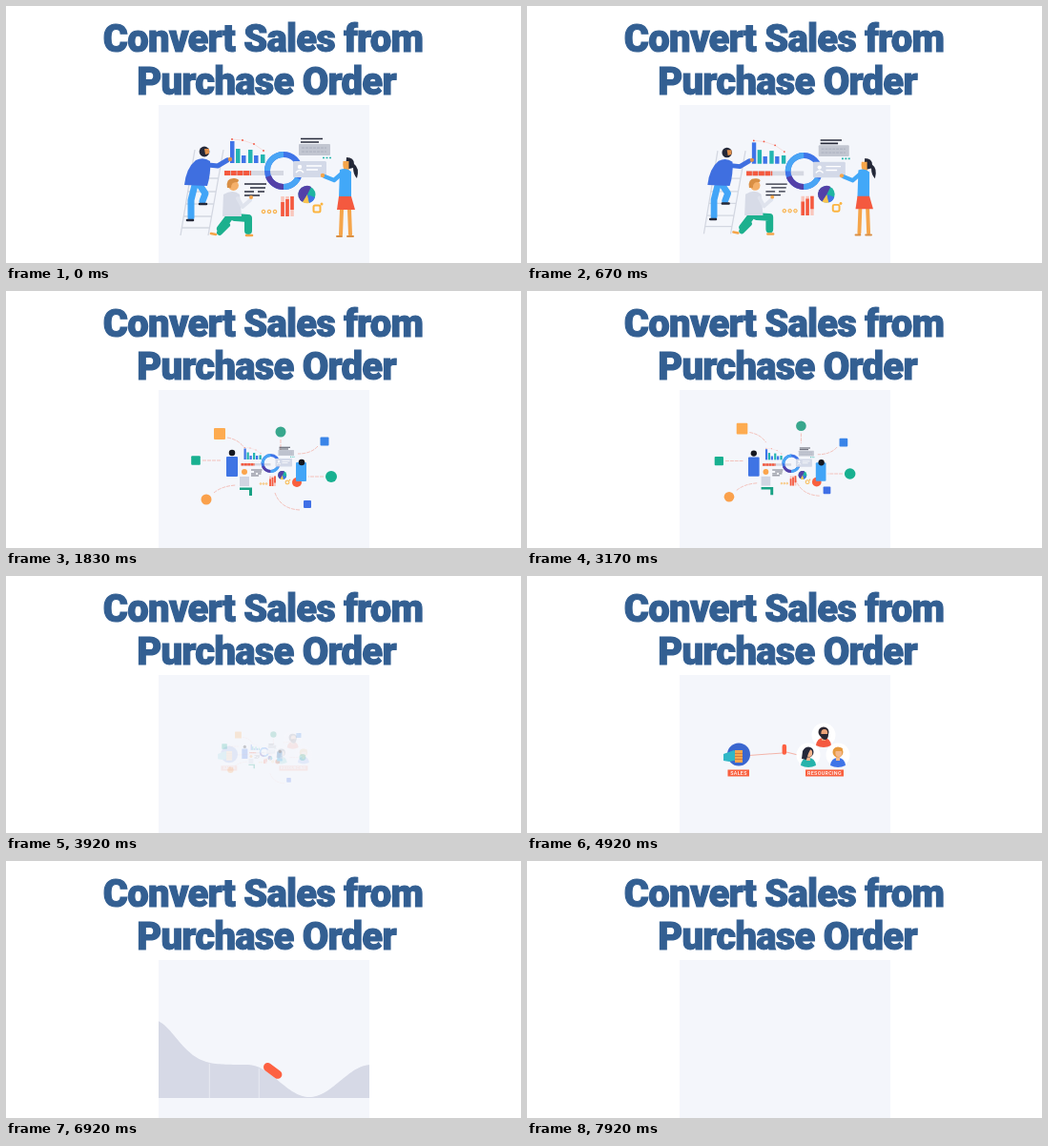
An HTML page for the animation above (8000 ms loop, 540 by 270 pixels).

```html
<!DOCTYPE html>
<html lang="en">
<head>
<meta charset="utf-8">
<title>Convert Sales from Purchase Order</title>
<style>
  html, body { margin: 0; height: 100%; overflow: hidden; background: #fff; }
  svg { display: block; width: 100%; height: 100%; }
  .title { font: 900 40px Roboto, "Open Sans", sans-serif; letter-spacing: -.75px; fill: #335f92; stroke: #335f92; stroke-width: 1.1; text-anchor: middle; }
  .label { font: 500 5.4px Roboto, sans-serif; letter-spacing: .3px; fill: #fff; text-anchor: middle; }
  .limb { fill: none; stroke-linecap: round; stroke-linejoin: round; }
</style>
</head>
<body>
<svg viewBox="0 0 540 270">
  <clipPath id="frame"><rect x="160" y="104" width="221" height="166"/></clipPath>
  <text class="title" x="269.5" y="47.5">Convert Sales from</text>
  <text class="title" x="273" y="92.5">Purchase Order</text>
  <rect x="160" y="104" width="221" height="166" fill="#f4f6fb"/>

  <g clip-path="url(#frame)">
    <g id="apps"></g>

    <g id="office">
      <g id="ladder" stroke="#d3d7e1" stroke-width="1.3" fill="none">
        <path d="M198 151L183 241M228 151L212 241M195 168h30M193 181h30M190 195h30M188 208h30M186 221h30M184 233h30"/>
      </g>
      <g id="widgets">
        <g id="bars"></g>
        <path d="M237 140L248 141L260 145L270 152" fill="none" stroke="#f6c4bd" stroke-width=".5"/>
        <g fill="#f4513d"><circle cx="237" cy="140" r=".9"/><circle cx="248" cy="141" r=".9"/><circle cx="260" cy="145" r=".9"/><circle cx="270" cy="152" r=".9"/></g>
        <path d="M229 175.5h62" stroke="#d5d8e2" stroke-width="5"/>
        <path d="M229 175.5h28" stroke="#f4593f" stroke-width="5" stroke-dasharray="6 .7"/>
        <g fill="none" stroke-width="6">
          <circle cx="291" cy="173" r="17" stroke="#3f74e8"/>
          <path d="M274 173A17 17 0 0 1 291 156" stroke="#4aa5f5"/>
          <path d="M291 190A17 17 0 0 1 275 179" stroke="#5340a8"/>
          <path d="M306 181A17 17 0 0 1 291 190" stroke="#4aa5f5"/>
        </g>
        <path d="M309 139.5h23M309 143h19" stroke="#272b3b" stroke-width="1.6"/>
        <rect x="307" y="145" width="33" height="12" rx="1" fill="#c2c6d1"/>
        <path d="M310 149h26M310 153h26" stroke="#abb0be" stroke-dasharray="3 1"/>
        <path d="M332 159.500h9" stroke="#2ab7ad" stroke-width="1.700" stroke-dasharray="2 1.500"/>
        <rect x="301" y="163" width="35" height="17" rx="1.500" fill="#d3d9e8"/>
        <circle cx="308" cy="169" r="2.200" fill="#fff"/>
        <path d="M304 175q4-5 8 0M315 168h16M315 172h12" fill="none" stroke="#fff" stroke-width="1.500"/>
        <path d="M250 187h23M256 191h16M250 195h10M264 195h7M250 199h16" stroke="#272b3b" stroke-width="1.300"/>
        <path d="M290 200v21M295 200v21M300 200v21" stroke="#f9c7bd" stroke-width="3.600"/>
        <path d="M290 206v15M295 203v18M300 200v14" stroke="#f4593f" stroke-width="3.600"/>
        <g fill="#fbe3bd" stroke="#f7ab3e"><circle cx="270" cy="216" r="1.800"/><circle cx="276" cy="216" r="1.800"/><circle cx="282" cy="216" r="1.800"/></g>
        <g><circle cx="315.500" cy="198" r="9" fill="#1fb5a0"/>
          <path d="M316 198L311 206A9 9 0 0 1 320 190Z" fill="#5340a8"/>
          <path d="M316 198L311 206A9 9 0 0 0 318 207Z" fill="#fbc24f"/>
          <path d="M316 198L318 207A9 9 0 0 0 324 201Z" fill="#3f74e8"/>
        </g>
        <rect x="322.500" y="209.500" width="7" height="7" rx="1.500" fill="none" stroke="#fbb43f" stroke-width="2"/>
        <circle cx="331" cy="208" r="1.500" fill="#fbb43f"/>
      </g>

      <g id="people">
        <g class="limb">
          <path d="M198 188L194 204L194 222M203 188L209 197L206 205" stroke="#42a5f7" stroke-width="7"/>
          <path d="M190 225h6M203 208h7" stroke="#242838" stroke-width="2.600"/>
          <path d="M212 167L222 168L232 162" stroke="#3f6fe0" stroke-width="5"/>
        </g>
        <path d="M199 162Q207 158 214 163Q215 176 211 189L187 188Q189 170 199 162Z" fill="#3f6fe0"/>
        <circle cx="235" cy="161" r="2.200" fill="#e08f4a"/>
        <circle cx="208" cy="153" r="5.400" fill="#242838"/>
        <path d="M208 150h5v5l-4 1z" fill="#e08f4a"/>

        <g class="limb">
          <path d="M234 222L225 234M240 222L254 223L254 236" stroke="#1cb08e" stroke-width="8"/>
          <path d="M224 238L232 230" stroke="#1cb08e" stroke-width="6"/>
          <path d="M215 239l5 1M252 241h6" stroke="#f5a54a" stroke-width="2.600"/>
        </g>
        <path d="M228 198Q238 192 245 198L247 221H227Z" fill="#d7dbe7"/>
        <path class="limb" d="M243 202L248 211L256 204" stroke="#dfe3ed" stroke-width="4"/>
        <circle cx="257" cy="201" r="2" fill="#f5a54a"/>
        <circle cx="238.500" cy="188.500" r="5.400" fill="#f5b06a"/>
        <path d="M232 191Q230 180 240 181Q246 182 243 185Q236 184 236 191Z" fill="#d98f45"/>

        <g class="limb">
          <path d="M352 214L351 240M360 214L361 240" stroke="#f5a54a" stroke-width="4"/>
          <path d="M347 242h5M358 242h6" stroke="#d98f45" stroke-width="2"/>
          <path d="M352 176L344 183L334 179" stroke="#42a8f8" stroke-width="4.500"/>
        </g>
        <path d="M357 159Q365 159 365 166Q371 170 368 181Q364 177 364 170L356 172Z" fill="#242838"/>
        <path d="M353.500 163h6v10h-4q-3-3-2-10z" fill="#f5a54a"/>
        <path d="M350 172Q357 169 362 174L362 201H349Z" fill="#42a8f8"/>
        <path d="M349 200H362L366 214H347Z" fill="#f4593f"/>
        <circle cx="332" cy="178" r="2.200" fill="#f5a54a"/>
      </g>

      <g id="blocks">
        <rect x="198" y="159" width="24" height="42" rx="2" fill="#3f74e4"/>
        <circle cx="210" cy="151" r="6.500" fill="#15171f"/>
        <circle cx="346" cy="213" r="10" fill="#f9603f"/>
        <rect x="344" y="171" width="22" height="40" rx="2" fill="#42a5f7"/>
        <circle cx="356" cy="171" r="6.500" fill="#15171f"/>
        <circle cx="236" cy="191" r="6" fill="#fba54c"/>
        <rect x="226" y="201" width="20" height="20" fill="#d0d5e2"/>
        <path d="M226 224h26v17h-6v-12h-20z" fill="#18a184"/>
      </g>
    </g>

    <g id="handoff">
      <path d="M233 188.500L268 186M272 185L284 188" stroke="#f3b5aa" stroke-width="1" fill="none"/>
      <circle cx="222" cy="187.500" r="12" fill="#3a66cf"/>
      <path d="M206 187l11-4 5 4v6l-10 2-6-1z" fill="#31b7c6"/>
      <rect x="218" y="183" width="8" height="13" fill="#f7a64e"/>
      <path d="M218 186.500h8M218 189.500h8M218 192.500h8" stroke="#c96f3a" stroke-width=".8"/>
      <g id="avatars"></g>
      <rect x="210.500" y="203.500" width="22.500" height="7" fill="#f9603f"/>
      <rect x="292" y="203.500" width="40" height="7" fill="#f9603f"/>
      <text class="label" x="222" y="209">SALES</text>
      <text class="label" x="312" y="209">RESOURCING</text>
    </g>

    <g id="landscape">
      <path id="hill" fill="#d6d9e6"/>
      <path id="marks" stroke="#e7e9f1" stroke-width="1"/>
    </g>
    <line id="pill" stroke="#fd6142" stroke-linecap="round"/>
  </g>
</svg>
<script>
const LOOP = 8000;
const $ = id => document.getElementById(id);
const clamp = v => Math.max(0, Math.min(1, v));
const mix = (a, b, p) => a + (b - a) * p;
const ramp = (t, from, to) => { const p = clamp((t - from) / (to - from)); return p * p * (3 - 2 * p); };

// Piecewise linear value through [time, value] pairs.
function track(t, keys) {
  for (let i = 1; i < keys.length; i++) {
    const [t0, a] = keys[i - 1], [t1, b] = keys[i];
    if (t < t1) return mix(a, b, clamp((t - t0) / (t1 - t0)));
  }
  return keys[keys.length - 1][1];
}

function show(id, opacity, scale = 1, cx = 270, cy = 187) {
  const el = $(id);
  el.setAttribute('opacity', opacity);
  el.setAttribute('transform', `translate(${cx} ${cy}) scale(${scale}) translate(${-cx} ${-cy})`);
}

$('bars').innerHTML = [[235, 23], [241, 15], [247, 8], [254, 14], [260, 8], [267, 9]]
  .map(([x, h], i) => `<rect x="${x}" y="${165 - h}" width="4.5" height="${h}" fill="${i % 2 ? '#22b5b0' : '#3f74e8'}"/>`).join('');

const avatar = (x, y, shirt, hair, skin, extra) => `<g transform="translate(${x} ${y})">
  <circle r="12.5" fill="#fff"/><path d="M-8 11Q-7 3 0 3Q7 3 8 11Q0 15 -8 11Z" fill="${shirt}"/>
  <rect x="-2" y="1" width="4" height="5" fill="${skin}"/><circle cy="-3" r="5.500" fill="${hair}"/>
  <ellipse cx=".8" cy="-2" rx="3.400" ry="4" fill="${skin}"/><path d="${extra}" fill="${hair}"/></g>`;
$('avatars').innerHTML =
  avatar(311, 167, '#f4593f', '#2b2630', '#eda377', 'M-4 -1L5 -1Q5 5 1 5Q-3 4 -4 -1Z') +
  avatar(295, 188, '#27b3ac', '#25283a', '#f2b48c', 'M-6 -4Q-3 -9 3 -7Q0 -3 -2 5L-7 4Z') +
  avatar(326, 188, '#3f74e8', '#e79a3e', '#f4b98d', 'M-5 -4Q-3 -10 5 -7L4 -4Z');

// Connected apps: position, size, bob phase and link path.
const apps = [
  { x: 224, y: 150, r: 6, color: '#fdab50', square: true, phase: .4, link: 'M232 154Q244 156 250 165' },
  { x: 199, y: 178, r: 4.8, color: '#18b090', square: true, phase: 0, link: 'M206 178H226' },
  { x: 288, y: 148, r: 5.5, color: '#38a78d', phase: .46, link: 'M288 156V167' },
  { x: 334, y: 158, r: 4.5, color: '#3984e8', square: true, phase: 0, link: 'M327 163Q320 171 306 171' },
  { x: 341, y: 195, r: 6, color: '#18b090', phase: .17, link: 'M333 195H317' },
  { x: 210, y: 219, r: 5.5, color: '#faa14c', phase: .11, link: 'M218 212Q226 205 241 204' },
  { x: 316, y: 224, r: 4, color: '#3f6fe6', square: true, phase: .89, link: 'M308 230Q288 229 282 212' }
];
$('apps').innerHTML = apps.map(a =>
  `<g><path d="${a.link}" fill="none" stroke="#f2aa9e" stroke-width=".7" stroke-dasharray="4 1"/>` +
  (a.square
    ? `<rect x="${a.x - a.r}" y="${a.y - a.r}" width="${2 * a.r}" height="${2 * a.r}" rx="1" fill="${a.color}"/></g>`
    : `<circle cx="${a.x}" cy="${a.y}" r="${a.r}" fill="${a.color}"/></g>`)).join('');
const appGroups = $('apps').children;

function ground(x) {
  const peak = 47 * Math.exp(-(((x - 241) / (x < 241 ? 37.5 : 33.6)) ** 2));
  const dip = x > 340 ? 17 * (1 - Math.cos((x - 340) / 20.6)) : 0;
  return 214 - peak + dip;
}

function drawOffice(t) {
  const leave = ramp(t, 3600, 4050);
  const zoom = track(t, [[0, 1], [670, .97], [830, .82], [1000, .54], [1200, .515], [1830, .5], [3170, .485], [3600, .48]]);
  show('office', 1 - leave, zoom * (1 - .6 * leave), 264, 189);
  const abstract = ramp(t, 690, 920);
  for (const id of ['people', 'ladder']) $(id).setAttribute('opacity', 1 - abstract);
  $('blocks').setAttribute('opacity', abstract);

  const spread = track(t, [[700, 1.05], [920, 1.05], [1830, 1], [3170, .967], [4000, .95]]);
  show('apps', ramp(t, 800, 1100) * (1 - leave), spread * (1 - .5 * leave));
  const sway = 18 * ramp(t, 2560, 3170);
  apps.forEach((a, i) => {
    const dy = -sway * Math.sin(a.phase + (t - 3170) / 260);
    appGroups[i].setAttribute('transform', `translate(0 ${dy})`);
  });
}

function drawHandoff(t) {
  const enter = ramp(t, 3850, 4200), leave = ramp(t, 5080, 5420);
  show('handoff', enter * (1 - leave), mix(.7, 1, enter) + track(t, [[4200, .02], [4920, 0]]) + .35 * leave);
}

function drawLandscape(t) {
  const scroll = (t - 6250) * .13;
  const enter = ramp(t, 5200, 5600), leave = ramp(t, 7050, 7880);
  let d = 'M160 249';
  for (let x = 160; x <= 382; x += 2) d += `L${x} ${mix(249, ground(x + scroll), enter)}`;
  $('hill').setAttribute('d', d + 'V249Z');
  $('marks').setAttribute('d', [300, 352].map(x => `M${x - scroll} ${ground(x) + 1}V249`).join(''));
  const el = $('landscape');
  el.setAttribute('opacity', enter * (1 - leave));
  el.setAttribute('transform', `translate(0 ${197 * leave}) scale(1 ${1 - leave})`);

  const u = 277 + scroll;
  const slope = Math.atan((ground(u + 1) - ground(u - 1)) / 2);
  const ride = ramp(t, 5100, 5500);
  const x = mix(track(t, [[4300, 238], [4920, 270], [5400, 277]]), 277 + 4.5 * Math.sin(slope), ride);
  const y = mix(182.3, ground(u) - 4.5 * Math.cos(slope), ride);
  const angle = mix(Math.PI / 2, slope, ride);
  const half = mix(3.2, 6.5, ride);
  const dx = half * Math.cos(angle), dy = half * Math.sin(angle);
  const pill = { x1: x - dx, y1: y - dy, x2: x + dx, y2: y + dy,
    'stroke-width': mix(4.5, 9, ride), opacity: ramp(t, 4200, 4350) * (1 - ramp(t, 7050, 7500)) };
  for (const name in pill) $('pill').setAttribute(name, pill[name]);
}

function render(now) {
  const step = Math.floor(((now % LOOP) + 7) * .012) % 96;   // twelve poses per second
  const t = step * 1000 / 12;
  drawOffice(t);
  drawHandoff(t);
  drawLandscape(t);
  requestAnimationFrame(render);
}
render(performance.now());
</script>
</body>
</html>
```
